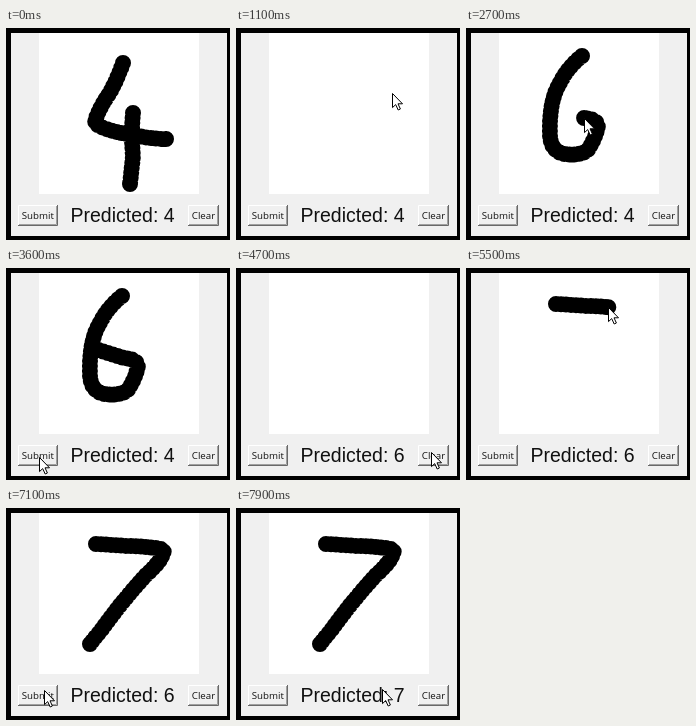
Recreate the animation shown at these times as an HTML page. Size 224x212 px, loop 8 s.

```html
<!DOCTYPE html>
<html lang="en">
<head>
<meta charset="utf-8">
<title>Digit recogniser</title>
<style>
  html, body { margin: 0; width: 100%; height: 100%; overflow: hidden; background: #000; }
  svg { display: block; width: 100%; height: 100%; }
  text { fill: #111; white-space: pre; }
  .label { font: 19.5px "Liberation Sans", Arial, sans-serif; }
  .button text { font: 9.7px "Open Sans", "Noto Sans", sans-serif; }
  .face { fill: #f0f0f0; }
  .light { fill: none; stroke: #fff; }
  .shade { fill: none; stroke: #a0a0a0; }
  .edge { fill: none; stroke: #696969; }
  .down .light { stroke: #696969; }
  .down .shade { stroke: #f0f0f0; }
  .down .edge { stroke: #fff; }
  .down text { transform: translate(1px, 1px); }
  #ink { fill: none; stroke: #000; stroke-width: 16; stroke-linecap: round; }
  #cursor { fill: #fff; stroke: #000; stroke-width: 1; }
</style>
</head>
<body>
<svg viewBox="0 0 224 212">
  <rect width="224" height="212"/>
  <rect x="5" y="5" width="216" height="203" fill="#f0f0f0"/>
  <rect x="33" y="5" width="160" height="161" fill="#fff"/>
  <path id="ink"/>
  <g class="button" id="submit">
    <rect class="face" x="12" y="177" width="40" height="21"/>
    <path class="light" d="M12.5 197V177.5H51"/>
    <path class="shade" d="M13 196.5H50.5V178"/>
    <path class="edge" d="M12 197.5H51.5V177"/>
    <text x="15.8" y="191">Submit</text>
  </g>
  <g class="button" id="clear">
    <rect class="face" x="182" y="177" width="31" height="21"/>
    <path class="light" d="M182.5 197V177.5H212"/>
    <path class="shade" d="M183 196.5H211.5V178"/>
    <path class="edge" d="M182 197.5H212.5V177"/>
    <text x="185.8" y="191">Clear</text>
  </g>
  <text class="label" x="64.5" y="194">Predicted: <tspan id="digit">4</tspan></text>
  <path id="cursor" d="M.5.5V14.6L3.7 11.6L6.2 17L8.4 16L6 10.8H10.5Z"/>
</svg>
<script>
const LOOP = 8000, STEP = 100, GAP = 5;
const $ = id => document.getElementById(id);
const ink = $('ink'), cursor = $('cursor'), digit = $('digit');

function stroke(d) {
  const path = document.createElementNS('http://www.w3.org/2000/svg', 'path');
  path.setAttribute('d', d);
  const length = path.getTotalLength();
  return { length, at: part => path.getPointAtLength(part * length) };
}

const four = [
  stroke('M117 35Q109 57 101 69Q90 86 89 95Q98 103 128 107Q145 111 160 111'),
  stroke('M127 85Q125 108 127 128L124 156')
];
const six = stroke('M116 28Q99 41 89 65Q83 82 84 108Q85 123 98 126Q112 128 121 123Q129 112 132 98Q131 91 118 90L92 82');
const seven = stroke('M90 36L122 38Q150 39 158 42Q157 52 140 67Q117 92 96 121L84 136');

// Rows of [time, ...values], joined by straight lines
const sixPace = [[1600, 0], [2000, .3], [2500, .66], [2600, .79], [2700, .87], [2900, 1]];
const sevenPace = [[5200, 0], [5600, .37], [6100, .8], [6300, .9], [6500, 1]];
const moves = [
  [700, 200, 184], [900, 198, 183], [1000, 182, 126], [1100, 156, 65],
  [1300, 128, 38], [1500, 116, 28], [1600, 116, 28],
  [2900, 92, 82], [3100, 78, 118], [3400, 48, 174], [3500, 36, 186], [3600, 33, 189],
  [3900, 33, 189], [4100, 108, 187], [4300, 209, 190], [4500, 199, 187],
  [4700, 195, 184], [4800, 139, 125], [4900, 113, 80], [5000, 96, 50], [5100, 90, 36],
  [5200, 90, 36], [6500, 84, 136], [6700, 70, 148], [7000, 40, 175],
  [7200, 36, 189], [7400, 36, 187], [7600, 36, 187], [7700, 60, 186],
  [7800, 106, 184], [7900, 146, 181]
];

function sample(rows, t) {
  let i = 0;
  while (i < rows.length - 2 && rows[i + 1][0] <= t) i++;
  const [a, b] = [rows[i], rows[i + 1]];
  const k = Math.min(1, Math.max(0, (t - a[0]) / (b[0] - a[0])));
  return a.slice(1).map((v, n) => v + (b[n + 1] - v) * k);
}

const within = (t, from, to) => t >= from && t < to;
const dot = p => `M${p.x.toFixed(1)} ${p.y.toFixed(1)}h.01`;

function dots(line, part = 1) {
  let d = '';
  for (let s = 0; s < part * line.length; s += GAP) d += dot(line.at(s / line.length));
  return part > 0 ? d + dot(line.at(part)) : '';
}

function draw(t) {
  const sixPart = sample(sixPace, t)[0], sevenPart = sample(sevenPace, t)[0];
  let d = '';
  if (t < 900) d = four.map(line => dots(line)).join('');
  else if (within(t, 1600, 4600)) d = dots(six, sixPart);
  else if (t >= 5200) d = dots(seven, sevenPart);
  ink.setAttribute('d', d);

  let [x, y] = sample(moves, t);
  if (within(t, 1600, 2900)) ({ x, y } = six.at(sixPart));
  if (within(t, 5200, 6500)) ({ x, y } = seven.at(sevenPart));
  cursor.setAttribute('transform', `translate(${Math.round(x)} ${Math.round(y)})`);
  cursor.style.visibility = t < 700 ? 'hidden' : 'visible';

  $('submit').classList.toggle('down', within(t, 3700, 3800) || within(t, 7200, 7400));
  $('clear').classList.toggle('down', within(t, 800, 900) || within(t, 4500, 4600));
  digit.textContent = t < 3800 ? 4 : t < 7400 ? 6 : 7;
}

const start = performance.now();
let last = -1;
function tick() {
  const t = Math.floor((performance.now() - start) % LOOP / STEP) * STEP;
  if (t !== last) draw(last = t);
  requestAnimationFrame(tick);
}
tick();
</script>
</body>
</html>
```
